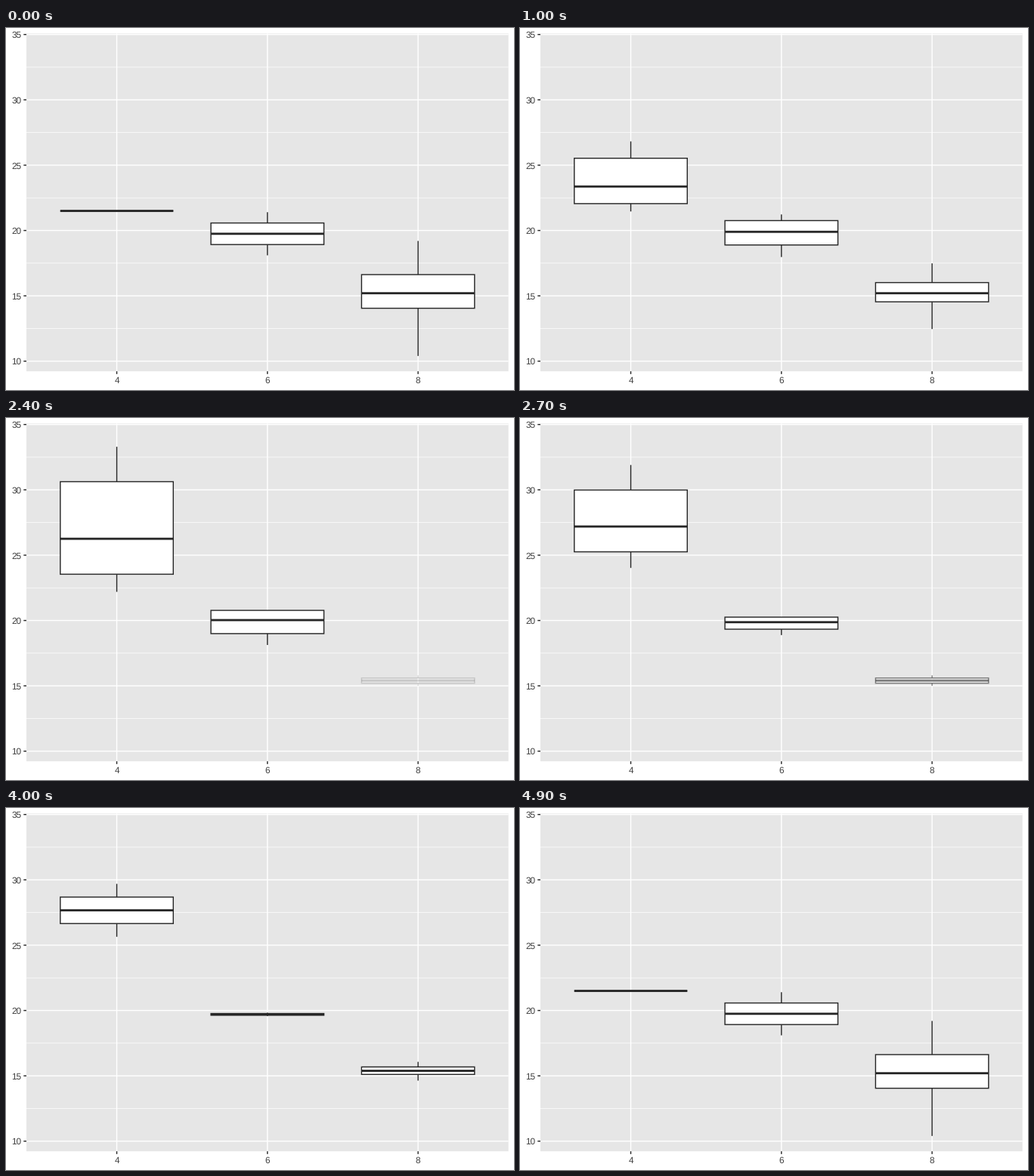
A matplotlib script that plays this animation: 672 px wide and 480 px high, repeating every 5 s.

```python
import math

import matplotlib.pyplot as plt
import numpy as np
from matplotlib.animation import FuncAnimation
from matplotlib.patches import Polygon, Rectangle

W, H, DPI = 672, 480, 96
LEFT, RIGHT, TOP, BOTTOM = 26.98, 664.67, 7.33, 455.2
Y_MIN, Y_MAX = 9.225, 35.075
INK, TEXT, PANEL = "#262626", "#404040", "#E6E6E6"
THIN, LINE, THICK = 0.71, 1.42, 2.84
CYLS = (4, 6, 8)
STEPS = 11

# Miles per gallon for each gear, by number of cylinders
MPG = [
    {4: [21.5], 6: [18.1, 21.4],
     8: [10.4, 10.4, 13.3, 14.3, 14.7, 15.2, 15.2, 15.5, 16.4, 17.3, 18.7, 19.2]},
    {4: [21.4, 22.8, 22.8, 24.4, 27.3, 30.4, 32.4, 33.9],
     6: [17.8, 19.2, 21.0, 21.0]},
    {4: [26.0, 30.4], 6: [19.7], 8: [15.0, 15.8]},
]
# First and last frame of the move out of each gear
MOVES = [(6, 16), (23, 32), (39, 49)]

plt.rcParams["font.family"] = "Liberation Sans"
plt.rcParams["text.hinting"] = "none"


def px(width):
    return width * 72 / DPI


def x_at(slot):
    return LEFT + (slot + 0.6) * (RIGHT - LEFT) / 3.2


def y_at(value):
    return BOTTOM - (value - Y_MIN) * (BOTTOM - TOP) / (Y_MAX - Y_MIN)


fig = plt.figure(figsize=(W / DPI, H / DPI), dpi=DPI, facecolor="white")
ax = fig.add_axes([0, 0, 1, 1])
ax.set_xlim(0, W)
ax.set_ylim(H, 0)
ax.axis("off")


def line(xs, ys, color, width, z):
    (art,) = ax.plot(xs, ys, color=color, lw=px(width), zorder=z,
                     solid_capstyle="butt", snap=False)
    return art


def label(x, y, text, align):
    ax.text(x, y, text, size=8.8, color=TEXT, ha=align, va="baseline")


def draw_panel():
    ax.add_patch(Rectangle((LEFT, TOP), RIGHT - LEFT, BOTTOM - TOP,
                           fc=PANEL, ec="none", zorder=0, snap=False))
    for value in np.arange(12.5, 35, 5):
        line([LEFT, RIGHT], [y_at(value)] * 2, "white", THIN, 1)
    for value in range(10, 36, 5):
        y = y_at(value)
        line([LEFT, RIGHT], [y, y], "white", LINE, 1)
        line([LEFT - 3.67, LEFT], [y, y], INK, LINE, 2)
        label(20.4, y + 4.5, str(value), "right")
    for slot, cyl in enumerate(CYLS):
        x = x_at(slot)
        line([x, x], [TOP, BOTTOM], "white", LINE, 1)
        line([x, x], [BOTTOM, BOTTOM + 3.67], INK, LINE, 2)
        label(x, 471, str(cyl), "center")


class Box:
    def __init__(self, slot):
        self.x = x_at(slot)
        half = 0.375 * (RIGHT - LEFT) / 3.2
        self.x0, self.x1 = self.x - half, self.x + half
        self.whiskers = [line([self.x] * 2, [0, 0], INK, LINE, 3) for _ in range(2)]
        self.body = ax.add_patch(Polygon([(0, 0)] * 4, closed=True, fc="white", ec=INK,
                                         lw=px(LINE), joinstyle="miter",
                                         zorder=4, snap=False))
        self.median = line([self.x0, self.x1], [0, 0], INK, THICK, 5)
        self.parts = [*self.whiskers, self.body, self.median]

    def show(self, stats, alpha):
        for part in self.parts:
            part.set_visible(stats is not None)
            part.set_alpha(alpha)
        if stats is None:
            return
        low, q1, mid, q3, high = y_at(stats)
        self.whiskers[0].set_ydata([q1, low])
        self.whiskers[1].set_ydata([q3, high])
        self.body.set_xy([(self.x0, q3), (self.x0, q1), (self.x1, q1), (self.x1, q3)])
        self.median.set_ydata([mid, mid])


def five_numbers(values):
    return np.percentile(values, [0, 25, 50, 75, 100])


STATS = [{cyl: five_numbers(v) for cyl, v in gear.items()} for gear in MPG]


def position(frame):
    """Current gear index and eased progress towards the next one."""
    for gear, (first, last) in enumerate(MOVES):
        if frame < first:
            return gear, 0.0
        if frame < last:
            t = 1 - (last - frame) / STEPS
            return gear, (1 - math.cos(math.pi * t)) / 2
    return 0, 0.0


def blend(start, end, p):
    """Boxes leave by shrinking to the median and enter by fading in."""
    if start is None:
        return (None, 1) if p == 0 else (end, p)
    if end is None:
        end = np.full(5, start[2])
    return start + (end - start) * p, 1


draw_panel()
boxes = [Box(slot) for slot in range(len(CYLS))]


def draw(frame):
    gear, p = position(frame)
    now, following = STATS[gear], STATS[(gear + 1) % len(STATS)]
    for cyl, box in zip(CYLS, boxes):
        box.show(*blend(now.get(cyl), following.get(cyl), p))
    return [part for box in boxes for part in box.parts]


anim = FuncAnimation(fig, draw, frames=50, interval=100, repeat=True, repeat_delay=0)
plt.show()
```
